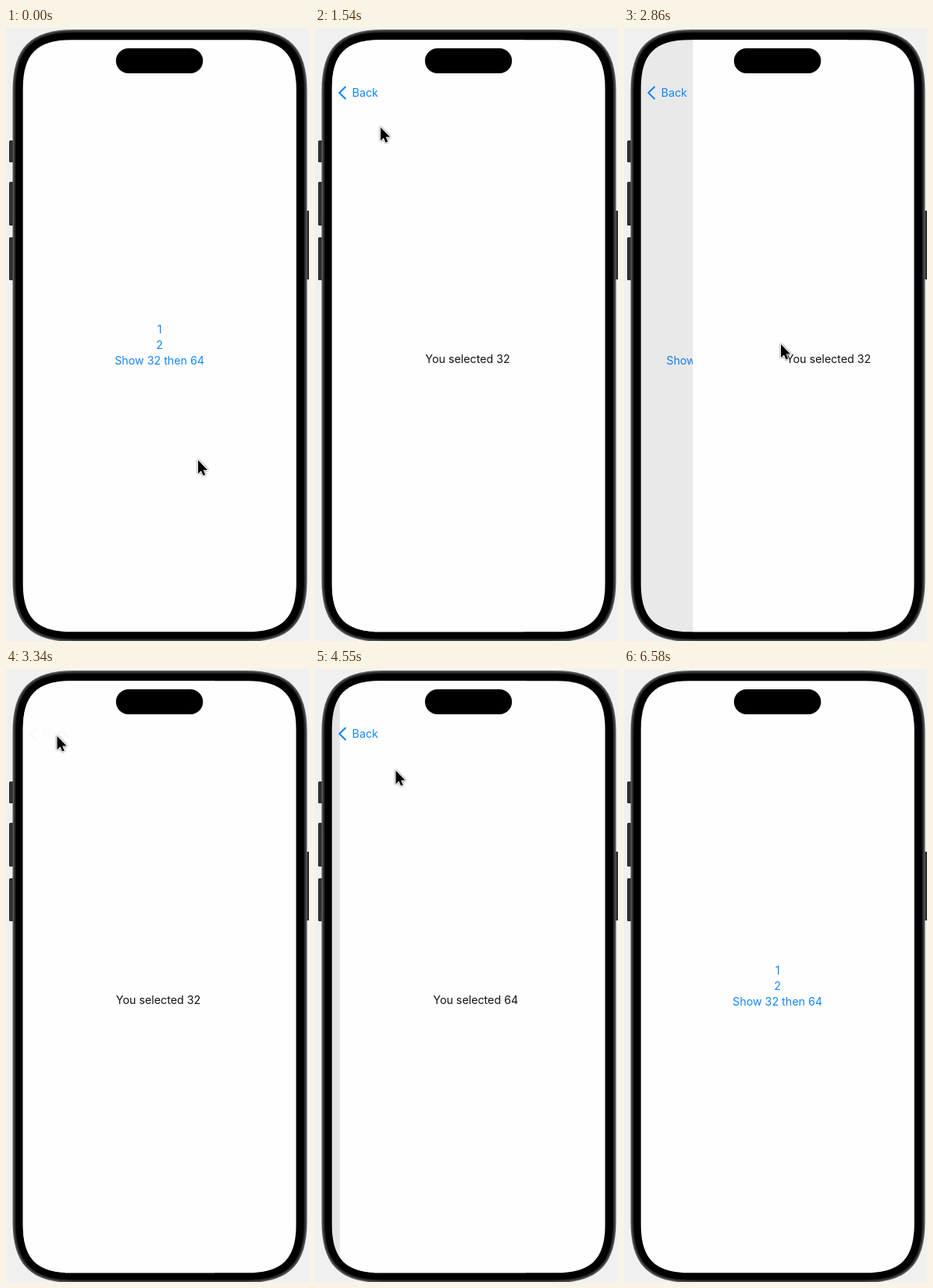
These frames come from a looping animation (388x785 px, 6.82 s). An HTML page:

```html
<!DOCTYPE html>
<html lang="en">
<head>
<meta charset="utf-8">
<title>Navigation stack demo</title>
<style>
  html, body { margin: 0; width: 100%; height: 100%; overflow: hidden; background: #f0f0f0; }
  svg { display: block; width: 388px; height: 785px; }
  text { font: 14.25px Inter, "Liberation Sans", sans-serif; fill: #111; }
  .link, .link text { fill: #1486f8; }
  .mid { text-anchor: middle; }
  #body { filter: blur(.6px); }
  #cursor { filter: drop-shadow(0 .5px 1px rgba(0, 0, 0, .65)); }
</style>
</head>
<body>
<svg viewBox="0 0 388 785">
  <defs>
    <clipPath id="screen"><path id="glass"/></clipPath>
  </defs>

  <g id="body">
    <g fill="#2d2f31">
      <rect x="4" y="144" width="8" height="28" rx="1.5"/>
      <rect x="4" y="197" width="8" height="56" rx="1.5"/>
      <rect x="4" y="268" width="8" height="55" rx="1.5"/>
      <rect x="382" y="234" width="8" height="88" rx="1.5"/>
    </g>
    <path id="rim" fill="#535557"/>
    <path id="band" fill="#292a2b"/>
    <path id="bezel"/>
  </g>

  <g clip-path="url(#screen)">
    <g id="root">
      <rect x="21" y="15" width="351" height="759" fill="#fefefe"/>
      <g class="link mid">
        <text x="196.6" y="391">1</text>
        <text x="196.6" y="411">2</text>
        <text x="196.6" y="431">Show 32 then 64</text>
      </g>
      <rect class="dim" x="21" y="15" width="351" height="759"/>
    </g>
    <g id="page32">
      <rect x="21" y="15" width="351" height="759" fill="#fefefe"/>
      <text class="mid" x="195" y="428.5">You selected 32</text>
      <rect class="dim" x="21" y="15" width="351" height="759"/>
    </g>
    <g id="page64">
      <rect x="21" y="15" width="351" height="759" fill="#fefefe"/>
      <text class="mid" x="195" y="428.5">You selected 64</text>
      <rect class="dim" x="21" y="15" width="351" height="759"/>
    </g>
    <path id="chevron" d="M38.9 75.6 31.2 83l7.7 7.4" fill="none" stroke="#1486f8"
          stroke-width="2.1" stroke-linecap="round" stroke-linejoin="round"/>
    <text id="label" class="link" x="47.6" y="88">Back</text>
  </g>
  <rect x="140.8" y="26" width="111.4" height="32" rx="16"/>

  <path id="cursor" d="M0 0V17.2L3.9 13.5 6.5 19.6 9.2 18.4 6.7 12.4H12Z"
        stroke="#fff" stroke-width="1.8" stroke-linejoin="round" paint-order="stroke"/>
</svg>

<script>
const LOOP = 6820, WIDTH = 350, RATE = 0.0185;
const $ = id => document.getElementById(id);
const pages = ['root', 'page32', 'page64'].map($);
const buttons = [...$('root').querySelectorAll('text')];

// Rounded box with continuous corners
function softBox(id, left, top, right, bottom, r) {
  const k = 1.25 * r, d = 0.365 * r;
  $(id).setAttribute('d', `M${left} ${top + k}
    C${left} ${top + d} ${left + d} ${top} ${left + k} ${top} H${right - k}
    C${right - d} ${top} ${right} ${top + d} ${right} ${top + k} V${bottom - k}
    C${right} ${bottom - d} ${right - d} ${bottom} ${right - k} ${bottom} H${left + k}
    C${left + d} ${bottom} ${left} ${bottom - d} ${left} ${bottom - k}Z`);
}
softBox('rim', 8.5, 2, 385.5, 786, 63);
softBox('band', 10.3, 3.8, 383.7, 784.2, 61);
softBox('bezel', 12.3, 5.8, 381.7, 782.2, 59);
softBox('glass', 21.7, 15.2, 371.5, 773.3, 49.5);

// Spans of screen updates: start, end, number of updates
const spans = [
  [120, 720, 6], [1090, 1760, 7], [1880, 2480, 6], [2740, 2860, 2], [3000, 3580, 6],
  [3700, 4060, 4], [4310, 4910, 6], [5380, 5980, 6], [6100, 6580, 5]
];

// lower and upper are page indices; button is the one tapped for a push
const moves = [
  { at: 1062, lower: 0, upper: 1, button: 0 },
  { at: 1824, lower: 0, upper: 1 },
  { at: 2695, lower: 0, upper: 1, button: 1 },
  { at: 3379, lower: 0, upper: 1 },
  { at: 4262, lower: 0, upper: 2, button: 2 },
  { at: 5328, lower: 1, upper: 2 },
  { at: 6045, lower: 0, upper: 1 }
];

// Pointer stops: time, x, y
const stops = [
  [100, 246, 553.5], [720, 197.7, 387], [1200, 197.7, 387], [1640, 65.5, 85], [1880, 65.5, 85],
  [2240, 212, 407], [2480, 201, 405], [2860, 201, 405], [3220, 65.5, 86], [3380, 65.5, 86],
  [3580, 198, 416], [3700, 206, 431], [4060, 204, 425], [4310, 204, 425],
  [4550, 103.5, 130], [4790, 66.5, 80], [LOOP, 66.5, 80]
];

function updateTime(t) {
  const span = spans.findLast(s => t >= s[0]);
  if (!span) return 0;
  const [start, end, count] = span, step = (end - start) / (count - 1);
  return start + step * Math.min(count - 1, Math.floor((t - start) / step + 0.15));
}

// Critically damped spring, from 1 down to 0
const spring = dt => (1 + RATE * dt) * Math.exp(-RATE * dt);

function pointer(t) {
  const i = stops.findIndex(s => s[0] > t);
  if (i < 1) return stops[0].slice(1);
  const [t0, x0, y0] = stops[i - 1], [t1, x1, y1] = stops[i];
  const u = (t - t0) / (t1 - t0), e = u * u * (3 - 2 * u);
  return [x0 + (x1 - x0) * e, y0 + (y1 - y0) * e];
}

function place(page, x, dim) {
  page.setAttribute('visibility', 'visible');
  page.setAttribute('transform', `translate(${x.toFixed(2)})`);
  page.querySelector('.dim').setAttribute('opacity', dim);
}

function draw(t) {
  const move = moves.findLast(m => t >= m.at) || { at: -LOOP, lower: 0, upper: 1 };
  const next = moves.find(m => t < m.at);
  const push = 'button' in move, age = t - move.at;
  const cover = push ? 1 - spring(age) : spring(age);

  for (const page of pages) page.setAttribute('visibility', 'hidden');
  place(pages[move.lower], -0.3 * WIDTH * cover, 0.1 * cover);
  place(pages[move.upper], WIDTH * (1 - cover), 0);
  buttons.forEach((b, i) => b.setAttribute('opacity', move.button === i ? 0.02 : 1));

  let chevron = push || move.lower ? 1 : 0, label = chevron;
  if (move.lower) {
    chevron = Math.min(1, 0.3 + age / 350);
    label = Math.min(1, age / 500);
  }
  if (next && !('button' in next) && next.lower === 0 && next.at - t < 40) chevron = label = 0.04;
  $('chevron').setAttribute('opacity', chevron);
  $('label').setAttribute('opacity', label);

  $('cursor').setAttribute('transform', `translate(${pointer(t)})`);
  $('cursor').setAttribute('visibility', t < 6580 ? 'visible' : 'hidden');
}

const begin = performance.now();
function tick() {
  draw(updateTime((performance.now() - begin) % LOOP));
  requestAnimationFrame(tick);
}
tick();
</script>
</body>
</html>
```
